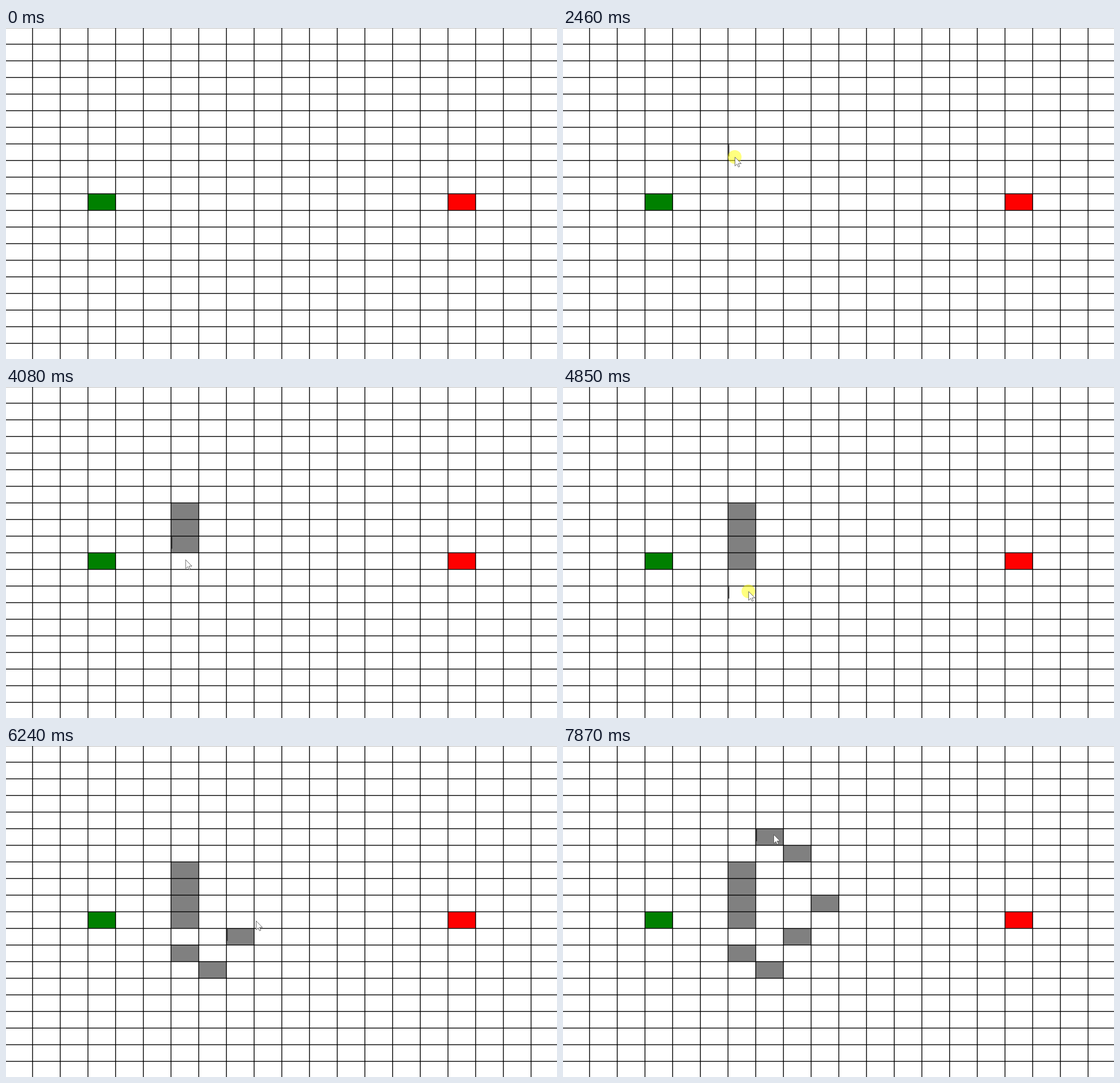
Write an HTML page with a canvas that moves like this. It is 966x580 px and loops after 8000 ms.

```html
<!DOCTYPE html>
<html lang="en">
<head>
<meta charset="utf-8">
<title>Grid walls</title>
<style>
  html, body { margin: 0; width: 100%; height: 100%; overflow: hidden; background: #fff; }
  canvas { display: block; }
</style>
</head>
<body>
<canvas id="stage" width="966" height="580"></canvas>
<script>
const ctx = document.getElementById('stage').getContext('2d');
const LOOP = 8000, START = 1460, STEP = 77.2; // the pointer is sampled at about 13 fps
const HOLD = 116, PAUSE = 150;                // button held down, rest before a click
const CELL_W = 48.555, CELL_H = 29.12;
const colX = col => 46.55 + CELL_W * col;
const rowY = row => 28.4 + CELL_H * row;

const pass = (time, x, y) => ({ x, y, arrive: time, leave: time });
const click = (time, x, y) => ({
  x, y, press: time, arrive: time - PAUSE, leave: time + HOLD,
  col: Math.floor((x - colX(0)) / CELL_W),
  row: Math.floor((y - rowY(0)) / CELL_H)
});

const stops = [
  pass(START, 338, 518),
  click(2417, 301, 226),
  click(2989, 322, 243),
  pass(3390, 324, 294),
  click(3884, 320, 281),
  click(4270, 313, 308),
  click(4811, 325, 358),
  click(5351, 382, 385),
  click(5999, 431, 345),
  click(6540, 446, 262),
  pass(6860, 447, 238),
  click(7157, 429, 191),
  click(7667, 369, 155)
];

const arrow = new Path2D('M.5 .3V15.8L4.1 12.4 6.5 17.6 8.8 16.6 6.4 11.6H11.5Z');

function fillCell(col, row, color) {
  ctx.fillStyle = color;
  ctx.fillRect(colX(col), rowY(row), CELL_W, CELL_H);
}

function drawGrid() {
  ctx.fillStyle = '#c0c0c0';
  ctx.fillRect(0, 0, 966, 1);
  ctx.fillStyle = '#000';
  for (let i = 0; i < 19; i++) {
    ctx.fillRect(colX(i) - 0.7, 0, 1.4, 580);
    ctx.fillRect(0, rowY(i) - 0.7, 966, 1.4);
  }
}

function pointerAt(now) {
  const i = stops.findLastIndex(stop => now >= stop.arrive);
  const from = stops[i], to = stops[i + 1];
  if (!to || now <= from.leave) return from;
  const p = (now - from.leave) / (to.arrive - from.leave);
  const ease = p * p * (3 - 2 * p);
  return { x: from.x + (to.x - from.x) * ease, y: from.y + (to.y - from.y) * ease };
}

function drawPointer({ x, y }, pressed) {
  ctx.save();
  ctx.translate(x, y);
  if (pressed) {
    ctx.fillStyle = 'rgba(255, 255, 0, 0.5)';
    ctx.beginPath();
    ctx.arc(0, 0, 12, 0, 2 * Math.PI);
    ctx.fill();
  }
  ctx.fillStyle = '#fff';
  ctx.fill(arrow);
  ctx.strokeStyle = '#444';
  ctx.lineWidth = 0.8;
  ctx.stroke(arrow);
  ctx.restore();
}

function draw(time) {
  const now = START + Math.floor((time - START + 15) / STEP) * STEP;
  const clicked = stops.filter(stop => now >= stop.press);
  const latest = clicked[clicked.length - 1];

  ctx.fillStyle = '#fff';
  ctx.fillRect(0, 0, 966, 580);
  fillCell(2, 9, '#008000');
  fillCell(15, 9, '#f00');
  for (const { leave, col, row } of clicked)
    if (now >= leave) fillCell(col, row, '#808080');
  drawGrid();

  if (latest) { // text caret in the cell clicked last
    ctx.fillStyle = '#222';
    ctx.fillRect(colX(latest.col) + 1, rowY(latest.row) + 1, 1.2, 21);
  }
  if (now >= START) drawPointer(pointerAt(now), latest && now < latest.leave);
}

const origin = performance.now();
function tick() {
  draw((performance.now() - origin) % LOOP);
  requestAnimationFrame(tick);
}
tick();
</script>
</body>
</html>
```
